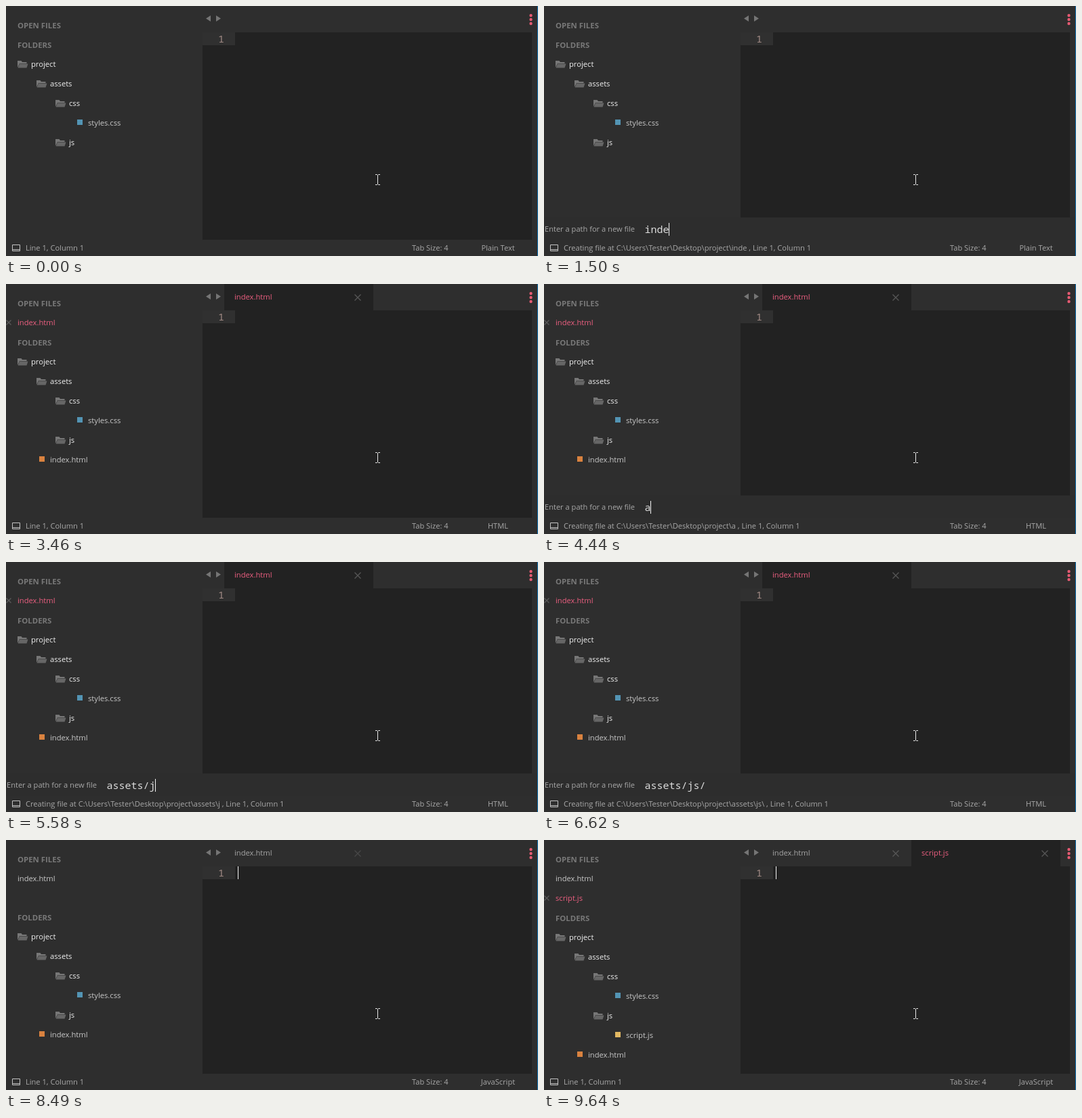
These frames come from a looping animation (785 by 370 pixels, 9760 ms). An HTML page:

```html
<!DOCTYPE html>
<html lang="en">
<head>
<meta charset="utf-8">
<title>Creating files in an editor</title>
<style>
  html, body { margin: 0; width: 100%; height: 100%; overflow: hidden; background: #2e2e2e; }
  svg { display: block; width: 100%; height: 100%; }
  text { font: 11.2px "Open Sans", "Noto Sans", sans-serif; white-space: pre; }
  .head { font-size: 11.4px; font-weight: 700; fill: #787878; }
  .folder { fill: #f0f0f0; }
  .file { fill: #c8c8c8; }
  .active { fill: #ec5f80; }
  .tab { fill: #a6a6a6; }
  .status { font-size: 11.1px; fill: #a8a8a8; }
  .mono { font: 15px "Noto Sans Mono", "DejaVu Sans Mono", monospace; fill: #dcdcdc; }
  .number { fill: #a28b85; }
</style>
</head>
<body>
<svg id="stage" viewBox="0 0 785 370"></svg>
<script>
const LOOP = 9760;
const ROW = 29;
const FILES = ['index.html', 'script.js'];
const ICON_COLORS = { css: '#5394b4', html: '#d9823f', js: '#e2b862' };

const type = (time, input) => [time, { input, caret: 1 }];
const blink = (time, caret) => [time, { caret }];

// Each step changes part of the state from its time on.
const STEPS = [
  [0, { input: null, caret: 0, syntax: 'Plain Text', open: 0, active: false,
        shift: 0, tree: 0, fresh: 1, slot: ROW }],
  blink(490, 0.6),
  type(610, ''), blink(980, 0.6),
  type(1100, 'i'), type(1220, 'in'), type(1350, 'ind'), type(1500, 'inde'),
  type(1750, 'index'), type(1900, 'index.'),
  type(2180, 'index.h'), type(2300, 'index.ht'), type(2550, 'index.html'),
  [2950, { input: null, caret: 1, syntax: 'HTML', shift: 28 }],
  [3070, { open: 1, active: true, shift: ROW, tree: 1, fresh: 0.5 }],
  [3190, { fresh: 1 }],
  blink(3330, 0.5), blink(3460, 0),
  type(3830, ''), blink(4200, 0.6),
  type(4330, 'a'), type(4450, 'ass'), type(4570, 'asse'),
  type(4700, 'assets'), type(4930, 'assets/'),
  blink(5310, 0.6), blink(5430, 0.2),
  type(5580, 'assets/j'), type(5700, 'assets/js'), type(5980, 'assets/js/'),
  blink(6350, 0.6), blink(6470, 0.2), blink(6620, 0),
  type(6990, 'assets/js/s'), type(7110, 'assets/js/sc'), type(7230, 'assets/js/scr'),
  type(7370, 'assets/js/scri'), type(7510, 'assets/js/scrip'),
  type(7630, 'assets/js/script'), type(7880, 'assets/js/script.'),
  type(8000, 'assets/js/script.j'), type(8120, 'assets/js/script.js'),
  [8490, { input: null, caret: 1, syntax: 'JavaScript', active: false, shift: 57 }],
  [8610, { open: 2, active: true, shift: 2 * ROW, tree: 2, fresh: 0.5, slot: 20 }],
  [8850, { fresh: 1, slot: ROW, caret: 0.5 }],
  blink(8970, 0), blink(9520, 0.5), blink(9640, 1)
];

const text = (x, y, cls, str, extra = '') =>
  `<text x="${x}" y="${y}" class="${cls}" ${extra}>${str}</text>`;
const rect = (x, y, w, h, fill, opacity = 1) =>
  `<rect x="${x}" y="${y}" width="${w}" height="${h}" fill="${fill}" opacity="${opacity}"/>`;
const path = (d, attrs) => `<path d="${d}" ${attrs}/>`;
const cross = (x, y, r, color) =>
  path(`M${x - r} ${y - r}l${2 * r} ${2 * r}m0 ${-2 * r}l${-2 * r} ${2 * r}`,
    `fill="none" stroke="${color}" stroke-width="1.3"`);

function folder(depth, y, name) {
  const x = 17 + 28 * depth;
  return `<g transform="translate(${x} ${y - 9})">` +
    path('M0 10V0h5.5l1.5 2h6.5v2H3z', 'fill="#777"') +
    path('M3 4.6h12.5L13.5 10.5H.6z', 'fill="#666"') +
    `</g>` + text(x + 20, y, 'folder', name);
}

function file(depth, y, name, opacity = 1) {
  const x = 37 + 28 * depth;
  const color = ICON_COLORS[name.split('.')[1]];
  return `<g opacity="${opacity}">` + rect(x - 16, y - 9, 8, 8, color) +
    text(x, y, 'file', name) + '</g>';
}

function sidebar(s) {
  let out = text(17, 33, 'head', 'OPEN FILES');
  for (let i = 0; i < s.open; i++) {
    const y = 61 + ROW * i;
    const on = s.active && i === s.open - 1;
    out += text(17, y, on ? 'active' : 'file', FILES[i]);
    if (on) out += cross(4, y - 4, 3.5, '#5a5a5a');
  }
  out += text(17, 62 + s.shift, 'head', 'FOLDERS');

  const y = row => 90 + s.shift + ROW * row;
  out += folder(0, y(0), 'project') + folder(1, y(1), 'assets') +
    folder(2, y(2), 'css') + file(3, y(3), 'styles.css') + folder(2, y(4), 'js');
  if (s.tree === 1) out += file(1, y(5), FILES[0], s.fresh);
  if (s.tree === 2) out += file(3, y(5), FILES[1], s.fresh) + file(1, y(5) + s.slot, FILES[0]);
  return out;
}

function tabs(s) {
  let out = path('M302 14v9l-7-4.5zM310 14v9l7-4.5z', 'fill="#757575"');
  for (let i = 0; i < s.open; i++) {
    const x = 322 + 220 * i;
    const on = s.active && i === s.open - 1;
    if (on) out += rect(x, 0, 220, 39, '#222');
    out += text(x + 15, 23, on ? 'active' : 'tab', FILES[i]) +
      cross(x + 197, 20, 4.5, s.active ? '#575757' : '#484848');
  }
  for (const y of [14, 20, 26]) out += `<circle cx="774.5" cy="${y}" r="2.2" fill="#e65a72"/>`;
  return out;
}

function editor() {
  return rect(290, 39, 486, 307, '#222') + rect(290, 39, 48, 19, '#303030') +
    text(313, 54, 'mono number', '1') +
    path('M545 249.5h2.5l1 1 1-1h2.5M548.5 250v14M545 264.5h2.5l1-1 1 1h2.5',
      'fill="none" stroke="#e8e8e8"');
}

function bottom(s) {
  const prompting = s.input !== null;
  let label = 'Line 1, Column 1';
  let out = '';
  if (prompting) {
    label = `Creating file at C:\\Users\\Tester\\Desktop\\project\\${s.input.replace(/\//g, '\\')} , ${label}`;
    out += rect(0, 313, 784, 33, '#2d2d2d') +
      text(1, 334, 'status', 'Enter a path for a new file') +
      text(148.5, 336, 'mono', s.input);
  }
  out += prompting
    ? rect(148 + 9 * s.input.length, 321, 1, 19, '#f4f4f4', s.caret)
    : rect(342, 39, 1, 19, '#f4f4f4', s.caret);
  return out +
    path('M9.5 353.5h11v9h-11zM10 360.5h10', 'fill="none" stroke="#c4c4c4"') +
    text(29, 362, 'status', label) +
    text(599, 362, 'status', 'Tab Size: 4') +
    text(726, 362, 'status', s.syntax, 'text-anchor="middle"');
}

const scene = s => rect(0, 0, 785, 370, '#2e2e2e') + sidebar(s) + tabs(s) +
  editor() + bottom(s) + rect(784, 0, 1, 370, '#1878b8');

const stage = document.getElementById('stage');
const start = performance.now();
let shown = -1;

function frame() {
  const time = (performance.now() - start) % LOOP;
  const count = STEPS.filter(([at]) => at <= time).length;
  if (count !== shown) {
    shown = count;
    stage.innerHTML = scene(Object.assign({}, ...STEPS.slice(0, count).map(step => step[1])));
  }
  requestAnimationFrame(frame);
}
frame();
</script>
</body>
</html>
```
